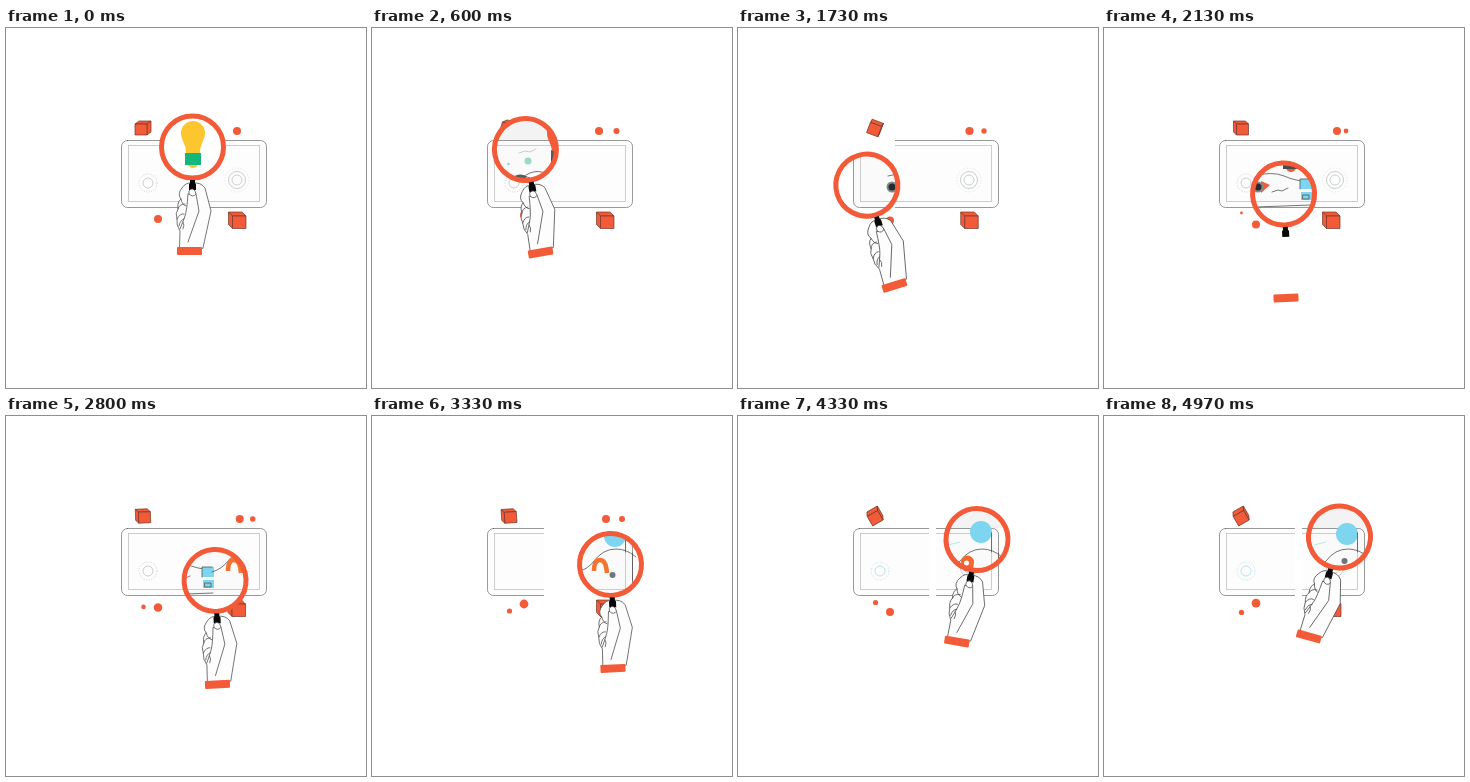
An HTML page that plays this animation: 360x360 px, repeating every 5 s.

```html
<!DOCTYPE html>
<html lang="en">
<head>
<meta charset="utf-8">
<title>Search illustration</title>
<style>
  html, body { margin: 0; width: 100%; height: 100%; overflow: hidden; background: #fff; }
  svg { display: block; width: 100vw; height: 100vh; }
  .line { fill: none; stroke: #555; stroke-width: .8; stroke-linecap: round; stroke-linejoin: round; }
  .soft { fill: none; stroke: #bdc3c1; stroke-width: .8; }
  .red { fill: #f25a38; }
  .cyan { fill: #7dd5ef; }
  .cube path { fill: #f25a38; stroke: #74372a; stroke-width: .7; stroke-linejoin: round; }
</style>
</head>
<body>
<svg viewBox="0 0 360 360">
  <defs>
    <clipPath id="bounds">
      <rect id="leftPart" y="108" height="76"/>
      <rect id="rightPart" y="108" height="76"/>
    </clipPath>
    <clipPath id="glass"><circle id="glassHole" r="30"/></clipPath>
    <g id="frame">
      <rect x="115.5" y="112.5" width="145" height="67" rx="6" class="line" stroke-opacity=".75"/>
      <rect x="122.5" y="117.5" width="131" height="56" class="soft"/>
    </g>
  </defs>

  <g clip-path="url(#bounds)">
    <rect x="115.500" y="112.500" width="145" height="67" rx="6" fill="#fdfdfd"/>
    <use href="#frame"/>
    <g id="leftDial" class="soft">
      <circle cx="142" cy="155" r="5"/>
      <circle cx="142" cy="155" r="9" stroke-dasharray="1 1.5"/>
    </g>
    <g id="rightDial" class="soft">
      <circle cx="231" cy="152" r="5"/>
      <circle cx="231" cy="152" r="8.500"/>
      <circle cx="231" cy="152" r="12" stroke-dasharray="1 2" stroke-opacity=".6"/>
    </g>
  </g>

  <g id="dots" class="red"></g>
  <g id="topCube" class="cube"></g>
  <g id="lowCube" class="cube"></g>

  <g clip-path="url(#glass)">
    <rect width="360" height="360" fill="#fff"/>
    <g id="scene">
      <rect x="80" y="80" width="200" height="32" fill="#f3f3f3"/>
      <rect x="115" y="112" width="146" height="68" fill="#fafafa"/>
      <use href="#frame"/>
    </g>
    <g id="bulb">
      <path id="bulbGlass" d="M175 105a12 12 0 0 1 24 0c0 8-5 10-5 20h-14c0-10-5-12-5-20z"/>
      <path id="bulbTip" d="M182 136h10q-1 4-5 4t-5-4z"/>
      <rect id="bulbBase" x="179" y="125" width="16" height="12"/>
    </g>
    <g id="sprouts">
      <circle cx="156" cy="133" r="3.500" fill="#9cd9c9"/>
      <circle cx="136.500" cy="136" r="1.300" fill="#9cd9c9"/>
      <path class="line" stroke-opacity=".35" d="M147 125l6-2 5 1 6-3"/>
      <path class="line" d="M138 151q8-6 20-1m-4-3q8-5 16-3"/>
      <path d="M140 150q6-6 15-2l-2 3z" fill="#52605d"/>
      <path d="M179 122l4 2v8l-4-3z" fill="#52605d"/>
    </g>
    <g id="launch">
      <path class="cyan" d="M104 127l4-2 8 10v10h-6l-6-8z"/>
      <path d="M104 127l6 9v9" fill="none" stroke="#55b5d2" stroke-width=".7"/>
      <circle class="cyan" cx="136" cy="136" r="6.500"/>
      <path class="line" d="M115.500 120v58M116 154q14 10 26 9t8-2M138 147q8-3 14-1"/>
      <g id="rocketLeft">
        <path d="M136 148q8-4 14 1v8q-7 5-14-1z" fill="#a7b0b1"/>
        <path class="red" d="M130 150l8-2-1 9zM138 156l2 4 4-2z"/>
        <circle cx="142.500" cy="152" r="3.800" fill="#252a2c"/>
      </g>
    </g>
    <g id="trail">
      <path class="line" d="M150 148q18-5 30 0t20 5M152 179l55-2M168 164l6-2 4 1 6-3"/>
      <path class="red" d="M157 153l9 4-9 8z"/>
      <circle cx="154" cy="159" r="5.500" fill="#7f8b8d"/>
      <circle cx="154" cy="159" r="3.500" fill="#252a2c"/>
      <path class="cyan" d="M196 151h12v10h-12zM197 164h11v8h-11z"/>
      <path class="line" d="M196 161v-10h10M199 167h6v4h-6z"/>
    </g>
    <g id="hill">
      <circle id="sun" class="cyan" cx="243" r="11"/>
      <path class="line" d="M206 156q10-3 16-11 9-12 22-12 11 0 20 8M260.500 137v28M253.500 117v19"/>
      <path d="M210 129l12-3" stroke="#a6dff1" stroke-width=".8"/>
      <circle id="pebble" cx="240.500" r="3" fill="#70777a"/>
      <path id="magnet" d="M222 155q0-11 6-11t7 13" fill="none" stroke="#f4742f" stroke-width="4.500"/>
      <g id="pin">
        <path d="M223 146a6.500 6.500 0 0 1 13 0l-1 8-4-1q-8-1-8-7z" fill="#f4672f"/>
        <circle cx="228.500" cy="147" r="2.500" fill="#fff"/>
      </g>
    </g>
  </g>

  <g id="tool">
    <circle r="31" fill="none" stroke="#f25a38" stroke-width="5"/>
    <g transform="translate(-186.500 -119)">
      <g id="hand">
        <path class="line" style="fill:#fdfdfd" d="M173.500 220L174 203q-4-6-3-12-2-6 1-10-1-7 3-10-4-5 1-11 4-6 10-5 9-1 13 5l6 23-8 37z"/>
        <path class="line" d="M172 181q1-5 7-5M171 191q3-6 7-5M173 198q1-6 5-7M175 171q1 6 5 7M182 166q-1 16-3 22t-5 13M190 166l3 17-11 31M177 194q2 3 0 7"/>
      </g>
      <path d="M184 152h5v3l1 1v6h-7v-6l1-1z" fill="#080808"/>
      <path id="thumb" class="line" style="fill:#fff" d="M183 166v-3q3-4 6 0l1 3q-3 4-7 0z"/>
      <rect class="red" x="171" y="219" width="25" height="8" rx="1"/>
    </g>
  </g>
</svg>

<script>
const LOOP = 5000;
const $ = id => document.getElementById(id);

// Each row: time, then the values reached at that time
const lensKeys = [
  [0, 186.5, 119, 0], [70, 186.5, 119, 0], [600, 153.5, 121.5, -10],
  [1100, 118.6, 148, -25], [1330, 118.5, 149.5, -25.5], [1640, 123, 155, -20],
  [2130, 179.5, 166, -3], [2730, 205, 165, -3], [3200, 234.5, 154, -3],
  [3330, 238.5, 148.5, -3], [3700, 241.5, 138, 1], [4330, 239, 123.5, 9.5],
  [4970, 235.5, 121, 15.5], [LOOP, 235.5, 121, 15.5]
];
// Rotation and depth offset of the upper cube
const topKeys = [
  [0, 0, 4, -3], [1330, 40, 4, -4], [2130, 0, -3, -3],
  [3330, -4, -3, -3], [4330, -30, 2, -4], [LOOP, -30, 2, -4]
];
const lowKeys = [[0, 222], [600, 224], [1330, 226.5], [2130, 218], [3330, 224], [4330, 222], [LOOP, 219]];
// Centre and radius
const dotKeys = [
  [[0, 231, 103, 4], [600, 227, 103, 4], [1330, 229.5, 103, 4.2], [2130, 233, 103, 4], [3330, 234, 103, 4], [LOOP, 234, 103, 4]],
  [[0, 240, 103, 0], [600, 244.5, 103, 3], [1330, 250, 103, 3], [2130, 242, 103, 2.4], [3330, 250, 103, 3], [LOOP, 250, 103, 3]],
  [[0, 152, 191, 4], [600, 152, 187, 4], [1330, 152, 188, 4], [2130, 152, 196.5, 4], [3330, 152, 188, 4.4], [4330, 152, 196, 4], [LOOP, 152, 187, 4.4]],
  [[0, 137.5, 190, 0], [1330, 137.5, 192, 0], [2130, 137.5, 185, 1.4], [3330, 137.5, 195, 2.6], [4330, 137.5, 186.5, 2.6], [LOOP, 137.5, 196.5, 2.6]]
];
const sunKeys = [[0, 118], [3330, 120], [4330, 116], [LOOP, 118]];
const pebbleKeys = [[0, 159], [3330, 159], [4330, 170], [4970, 145], [LOOP, 145]];
// Visible spans of the panel: start, left x0, left x1, right x2
const spans = [[0, 112, 264, 264], [1000, 157, 264, 264], [1750, 112, 264, 264], [3050, 112, 172, 264], [3900, 112, 191, 198]];

// Smooth interpolation that never overshoots its keys
function at(keys, t) {
  let i = 0;
  while (i < keys.length - 2 && t >= keys[i + 1][0]) i++;
  const a = keys[i], b = keys[i + 1], h = b[0] - a[0], u = (t - a[0]) / h;
  return a.slice(1).map((p, n) => {
    const c = n + 1;
    const slope = k => k < 0 || k > keys.length - 2 ? 0 : (keys[k + 1][c] - keys[k][c]) / (keys[k + 1][0] - keys[k][0]);
    const tangent = k => {
      const l = slope(k - 1), r = slope(k);
      return l * r > 0 ? 2 * l * r / (l + r) : 0;
    };
    const u2 = u * u, u3 = u2 * u;
    return p * (2 * u3 - 3 * u2 + 1) + b[c] * (3 * u2 - 2 * u3)
      + h * (tangent(i) * (u3 - 2 * u2 + u) + tangent(i + 1) * (u3 - u2));
  });
}

function set(id, attrs) {
  for (const name in attrs) $(id).setAttribute(name, attrs[name]);
}

function show(id, on) {
  $(id).style.display = on ? '' : 'none';
}

// Box with a w by h front face, its back shifted by (dx, dy)
function cubePaths(x, y, w, h, dx, dy) {
  const side = dx > 0 ? x + w : x;
  return `<path d="M${x} ${y}h${w}l${dx} ${dy}h${-w}z"/>`
    + `<path d="M${side} ${y}v${h}l${dx} ${dy}v${-h}z"/>`
    + `<path d="M${x} ${y}h${w}v${h}h${-w}z"/>`;
}

const NS = 'http://www.w3.org/2000/svg';
const dots = dotKeys.map(() => $('dots').appendChild(document.createElementNS(NS, 'circle')));

function draw(t) {
  const [x, y, turn] = at(lensKeys, t);
  set('tool', { transform: `translate(${x} ${y}) rotate(${turn})` });
  set('glassHole', { cx: x, cy: y });

  const [, x0, x1, x2] = spans.filter(s => s[0] <= t).pop();
  set('leftPart', { x: x0, width: x1 - x0 });
  set('rightPart', { x: x2, width: 264 - x2 });
  show('leftDial', t < 2900 || t > 3900);
  show('rightDial', t < 300 || t > 1000);
  $('leftDial').style.stroke = t > 3900 ? '#a9d9e8' : '';

  dots.forEach((dot, i) => {
    const [cx, cy, r] = at(dotKeys[i], t);
    dot.setAttribute('cx', cx);
    dot.setAttribute('cy', cy);
    dot.setAttribute('r', r);
  });

  const [spin, dx, dy] = at(topKeys, t);
  set('topCube', { transform: `translate(137 100) rotate(${spin})` });
  $('topCube').innerHTML = cubePaths(-6 - dx / 2, -5.5 - dy / 2, 12, 11, dx, dy);
  $('lowCube').innerHTML = cubePaths(at(lowKeys, t)[0] + 4.5, 188, 13.5, 12.5, -4, -4);

  const lit = t < 400;
  set('bulbGlass', { fill: lit ? '#fdc52e' : '#f25a38' });
  set('bulbTip', { fill: lit ? '#fdc52e' : '#f25a38', transform: lit ? '' : 'translate(0 4)' });
  set('bulbBase', { fill: lit ? '#14b77b' : '#474d4f', height: lit ? 12 : 16 });
  show('bulb', t < 2800);
  show('scene', t > 250);
  show('sprouts', t > 250 && t < 850);
  show('launch', t >= 850 && t < 1720);
  show('trail', t >= 1720 && t < 2850);
  show('hill', t >= 2600);
  set('sun', { cy: at(sunKeys, t)[0] });
  set('pebble', { cy: at(pebbleKeys, t)[0] });
  show('magnet', t < 3900);
  show('pin', t >= 3900 && t < 4700);

  const gripping = t < 1870 || t > 2500;
  show('hand', gripping);
  show('thumb', gripping);
}

const start = performance.now();
function tick() {
  draw((performance.now() - start) % LOOP);
  requestAnimationFrame(tick);
}
tick();
</script>
</body>
</html>
```
